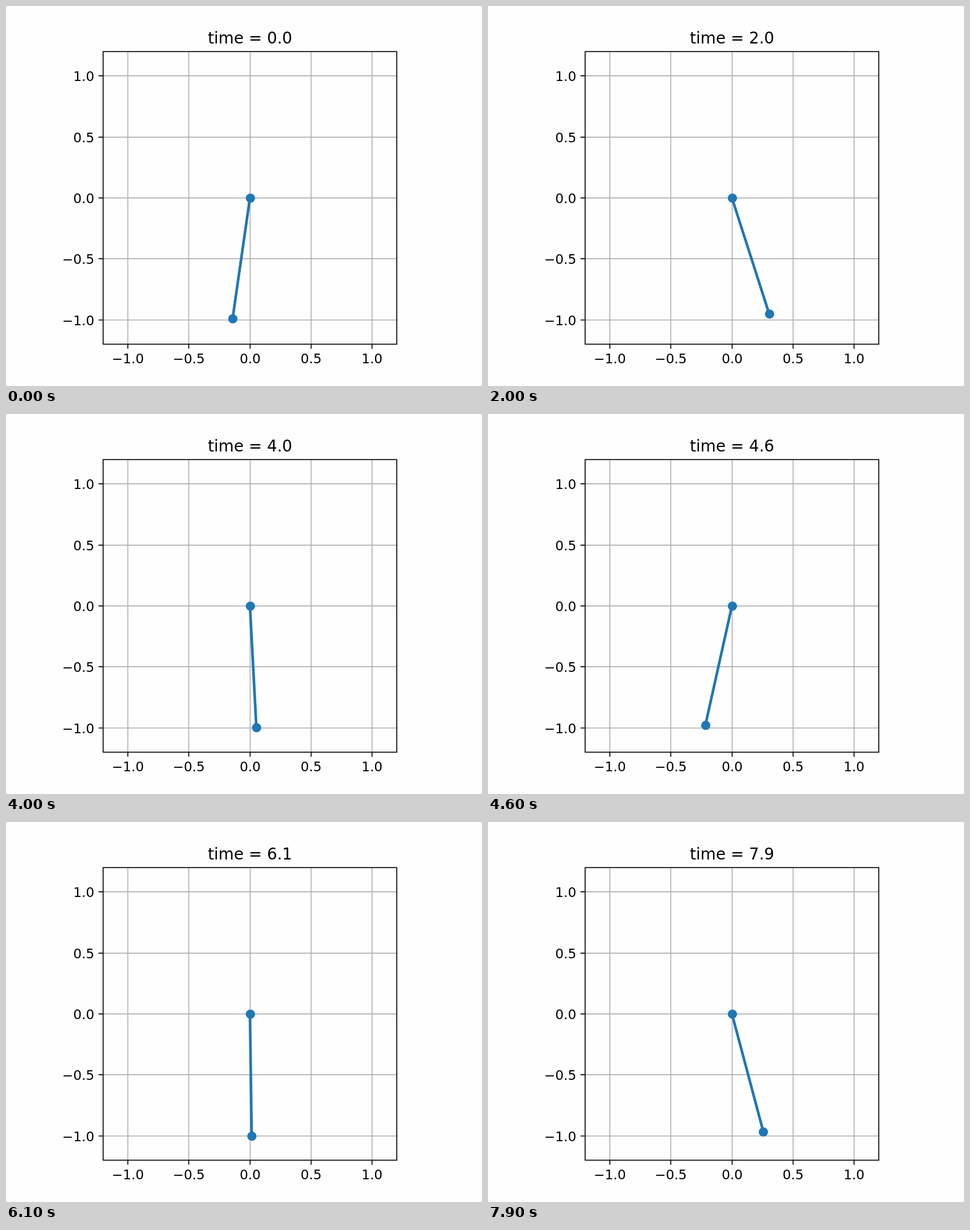
An HTML page that plays this animation: 837x669 px, repeating every 8 s.

```html
<!DOCTYPE html>
<html>
<head>
<meta charset="utf-8">
<title>Pendulum</title>
<style>
html, body { margin: 0; width: 100%; height: 100%; overflow: hidden; background: #fefefe; }
svg { display: block; font: 27.78px "DejaVu Sans", sans-serif; }
#title { font-size: 33.33px; }
</style>
</head>
<body>
<svg width="837" height="669" viewBox="0 0 1000 800" preserveAspectRatio="none">
  <path id="grid" stroke="#b0b0b0" stroke-width="2"/>
  <g fill="#1f77b4">
    <path id="rod" stroke="#1f77b4" stroke-width="5.56"/>
    <circle id="pivot" r="9.7"/>
    <circle id="bob" r="9.7"/>
  </g>
  <path id="ticks" stroke="#000" stroke-width="2"/>
  <rect x="204" y="96" width="617" height="616" fill="none" stroke="#000" stroke-width="2"/>
  <g id="labels"></g>
  <text id="title" x="512.7" y="79" text-anchor="middle"></text>
</svg>
<script>
const CX = 512.5, CY = 404, UNIT = 616 / 2.4;
const LEFT = 204, RIGHT = 821, TOP = 96, BOTTOM = 712, TICK = 9.7;
const $ = id => document.getElementById(id);

// turning points of the swing: time (s), angle (rad)
const turns = [
  [-.7, 2.21], [.4, -1.114], [1.512, 1.326], [2.485, -.696], [3.46, .676],
  [4.37, -.291], [5.42, .343], [6.58, -.176], [7.7, .295], [8.8, -.15]
];

function angle(t) {
  const i = turns.findIndex(turn => turn[0] > t);
  const [t0, a] = turns[i - 1], [t1, b] = turns[i];
  const ease = (1 - Math.cos(Math.PI * (t - t0) / (t1 - t0))) / 2;
  return a + (b - a) * ease;
}

function drawAxes() {
  let grid = "", ticks = "", labels = "";
  for (let v = -1; v <= 1; v += .5) {
    const x = Math.round(CX + v * UNIT), y = Math.round(CY - v * UNIT);
    const label = v.toFixed(1).replace("-", "\u2212");
    grid += `M${x} ${TOP}V${BOTTOM}M${LEFT} ${y}H${RIGHT}`;
    ticks += `M${x} ${BOTTOM}v${TICK}M${LEFT} ${y}h${-TICK}`;
    labels += `<text x="${x}" y="752.7" text-anchor="middle">${label}</text>` +
      `<text x="185.4" y="${y + 10.5}" text-anchor="end">${label}</text>`;
  }
  $("grid").setAttribute("d", grid);
  $("ticks").setAttribute("d", ticks);
  $("labels").innerHTML = labels;
}

// markers sit on pixel centres, the rod does not
function placeMarker(id, x, y) {
  $(id).setAttribute("cx", Math.round(x) + .5);
  $(id).setAttribute("cy", Math.round(y) + .5);
}

function draw(now) {
  const t = Math.floor(Math.max(now, 0) / 100) % 80 / 10;
  const a = angle(t);
  const x = CX + UNIT * Math.sin(a), y = CY + UNIT * Math.cos(a);
  $("rod").setAttribute("d", `M${CX} ${CY}L${x} ${y}`);
  placeMarker("bob", x, y);
  $("title").textContent = "time = " + t.toFixed(1);
  requestAnimationFrame(draw);
}

drawAxes();
placeMarker("pivot", CX, CY);
draw(performance.now());
</script>
</body>
</html>
```
